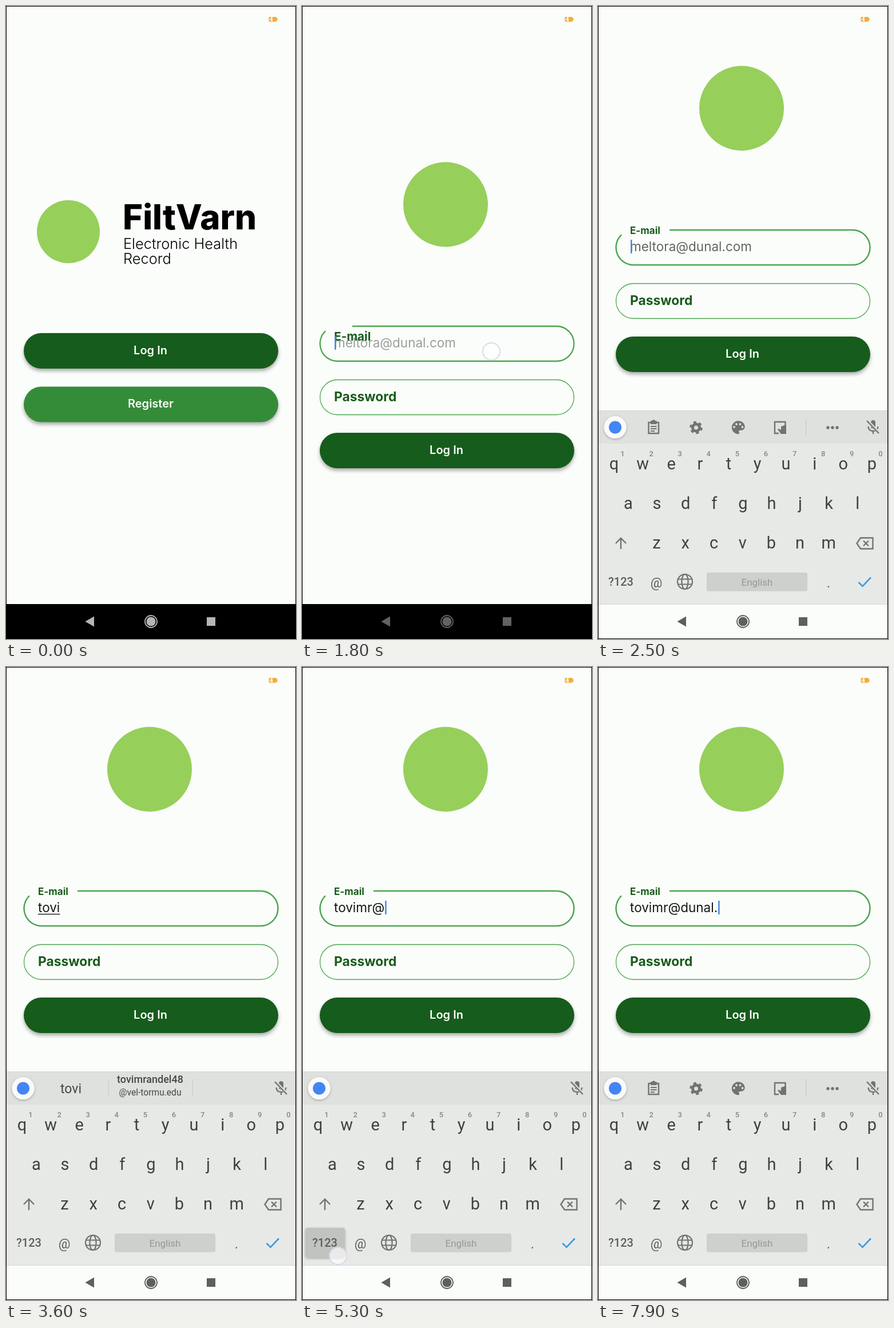
Recreate the animation shown at these times as an HTML page. Size 507 by 1105 pixels, loop 8000 ms.

```html
<!DOCTYPE html>
<html lang="en">
<head>
<meta charset="utf-8">
<title>Sign in</title>
<style>
  html, body { margin: 0; width: 100%; height: 100%; overflow: hidden; background: #fbfdfb; }
  svg { display: block; width: 507px; height: 1105px; }
  text { font-family: Inter, sans-serif; }
  .key text, text.key { font-family: Roboto, sans-serif; }
  .mid { text-anchor: middle; }
  .btn { font-size: 20px; font-weight: 600; fill: #fff; text-anchor: middle; }
  .label { font-weight: 700; fill: #195c1b; }
  .entry { font-size: 22.5px; }
  .line { fill: none; stroke: #707370; stroke-width: 2.4; }
</style>
</head>
<body>
<svg viewBox="0 0 507 1105" xmlns="http://www.w3.org/2000/svg">
  <defs>
    <filter id="drop" x="-10%" y="-20%" width="120%" height="160%">
      <feDropShadow dx="0" dy="4" stdDeviation="3" flood-color="#000" flood-opacity=".33"/>
    </filter>
    <filter id="soft" x="-30%" y="-30%" width="160%" height="160%">
      <feDropShadow dx="0" dy="1.5" stdDeviation="2" flood-color="#000" flood-opacity=".28"/>
    </filter>
  </defs>
  <rect width="507" height="1105" fill="#fbfdfb"/>

  <g id="page">
    <circle id="mark" fill="#97cf5b"/>
    <g id="welcome">
      <text x="204" y="390" font-size="60" font-weight="800">FiltVarn</text>
      <g font-size="25.4" font-weight="300">
        <text x="205" y="423.500">Electronic Health</text>
        <text x="205" y="449.500">Record</text>
      </g>
      <rect x="31" y="664.500" width="445" height="62" rx="31" fill="#358c38" filter="url(#drop)"/>
      <text class="btn" x="253" y="701">Register</text>
    </g>
    <g id="form">
      <path id="box" fill="none" stroke="#4ca64f"/>
      <text id="hint" class="entry" x="56" y="596" fill="#636563">meltora@dunal.com</text>
      <text id="label" class="label" x="56">E-mail</text>
      <text id="typed" class="entry" x="56" y="596" fill="#151815"></text>
      <path id="under" stroke="#222" stroke-width="1.3"/>
      <rect id="caret" y="576" width="2.500" height="24" fill="#4a85e0"/>
      <rect x="31.500" y="652.500" width="444" height="61" rx="30.500" fill="none" stroke="#4ca64f" stroke-width="1.300"/>
      <text class="label" x="56" y="690" font-size="22.8">Password</text>
    </g>
    <g id="login">
      <rect x="31" y="571" width="445" height="62" rx="31" fill="#195c1b" filter="url(#drop)"/>
      <text class="btn" x="252.500" y="608">Log In</text>
    </g>
  </g>

  <g>
    <path d="M461 19H471Q474.500 19.500 474.500 23.200T471 27.400H461Q459.500 27.400 459.500 26V20.400Q459.500 19 461 19Z" fill="#f4ad35"/>
    <text class="key" x="461" y="27" font-size="10" font-weight="700" fill="#fff">4</text>
  </g>

  <g id="board" class="key">
    <rect y="706" width="507" height="400" fill="#e7e9e7"/>
    <rect y="706" width="507" height="58" fill="#dfe1df"/>
    <path d="M0 706.500H507" stroke="#d3d5d3"/>
    <circle cx="30" cy="735.500" r="19.500" fill="#fafafa" filter="url(#soft)"/>
    <circle cx="30" cy="735.500" r="11" fill="#4285f4"/>

    <g id="tools" fill="#707370">
      <path class="line" d="M88.500 727H106V746H88.500Z"/>
      <path d="M92 724H94.500A3 3 0 0 1 100 724H102.500V730H92ZM92 733H102.500V735H92ZM92 737H102.500V739H92ZM92 741H99V743H92Z"/>
      <circle class="line" cx="171.500" cy="736" r="6" style="stroke-width:5"/>
      <circle class="line" cx="171.500" cy="736" r="9.500" style="stroke-width:3.500" stroke-dasharray="4.970"/>
      <path transform="translate(230 720.500) scale(1.270)" d="M12 3a9 9 0 0 0 0 18c.83 0 1.500-.67 1.500-1.500 0-.39-.15-.74-.39-1.010-.23-.26-.38-.61-.38-.99 0-.83.67-1.500 1.500-1.500H16c2.760 0 5-2.240 5-5 0-4.420-4.030-8-9-8z"/>
      <g fill="#dfe1df">
        <circle cx="238" cy="735" r="1.900"/><circle cx="242" cy="730" r="1.900"/>
        <circle cx="248.500" cy="730" r="1.900"/><circle cx="252.500" cy="735" r="1.900"/>
      </g>
      <path class="line" d="M316 746H309V726H327.500V733"/>
      <path d="M329 731V747H320L314 739L316 738L320 740V734Z"/>
      <path d="M363.500 720V750" stroke="#c4c6c4"/>
      <circle cx="402" cy="736" r="2.700"/><circle cx="410" cy="736" r="2.700"/><circle cx="418" cy="736" r="2.700"/>
    </g>
    <g id="suggest" class="mid" fill="#454845">
      <path d="M179.500 720V750M326.500 720V750" stroke="#c9cbc9"/>
      <text id="word" x="113.500" y="744" font-size="23"></text>
      <text x="252" y="726" font-size="18" font-weight="500">tovimrandel48</text>
      <text x="252" y="748" font-size="15.6">@vel-tormu.edu</text>
    </g>
    <g>
      <rect x="477" y="723" width="8" height="15" rx="4" fill="#707370"/>
      <path class="line" d="M472.500 734Q473 742 481 742T489.500 734M481 742V747"/>
      <path d="M471 724L492 746" stroke="#dfe1df" stroke-width="5"/>
      <path class="line" d="M470 724L491 746"/>
    </g>

    <rect id="press" x="6" y="979" width="69" height="52" rx="4" fill="#c1c3c1" filter="url(#soft)"/>
    <g id="keys" class="mid" font-size="29" fill="#3f423f"></g>
    <g id="hints" class="mid" font-size="13" font-weight="500" fill="#858885"></g>
    <path id="shift" class="line" d="M40 948V930M31 938L40 929L49 938"/>
    <path class="line" d="M452.500 938L459 928.500H480.500V947.500H459ZM464 933.500L473 942.500M473 933.500L464 942.500"/>
    <g class="mid" fill="#5b5e5b">
      <text id="mode" x="40" y="1012" font-size="20" font-weight="500"></text>
      <text id="at" x="102" y="1015" font-size="23">@</text>
      <text x="403" y="1015" font-size="24">.</text>
    </g>
    <g class="line" style="stroke-width:2.200">
      <circle cx="152" cy="1005" r="13"/><ellipse cx="152" cy="1005" rx="5.600" ry="13"/>
      <path d="M140 1000.500H164M140 1009.500H164"/>
    </g>
    <rect x="190" y="989" width="176" height="32.500" rx="3" fill="#ced0ce"/>
    <text class="mid" x="278" y="1011.500" font-size="17" fill="#959895">English</text>
    <path d="M455.500 1006L462.500 1013L477 997.500" fill="none" stroke="#3c9bdd" stroke-width="2.600"/>
    <g id="popup">
      <rect x="-24.500" y="-119" width="49" height="148" rx="4" fill="#fafbfa" filter="url(#soft)"/>
      <text id="big" class="mid" y="-73" font-size="36" fill="#3f423f"></text>
    </g>
  </g>

  <g>
    <rect id="bar" y="1044" width="507" height="61"/>
    <path id="rim" d="M0 1044.500H507" stroke="#d6d8d6"/>
    <g id="nav">
      <path d="M138.500 1074.500L154 1065.500V1083.500Z"/>
      <circle cx="253.500" cy="1074.500" r="8"/>
      <circle id="ring" cx="253.500" cy="1074.500" r="10.500" fill="none" stroke-width="1.800"/>
      <rect x="351" y="1067" width="15" height="15"/>
    </g>
  </g>
  <circle id="touch" r="15" fill="#fff" fill-opacity=".65" stroke="#d9d9e8" stroke-width="2"/>
  <rect x=".5" y=".5" width="506" height="1104" fill="none" stroke="#000"/>
</svg>

<script>
const LOOP = 8000, STEP = 100, HOLD = 200;
const $ = id => document.getElementById(id);
const set = (id, attrs) => { for (const k in attrs) $(id).setAttribute(k, attrs[k]); };
const show = (id, on) => set(id, { visibility: on ? "visible" : "hidden" });
const put = (id, s) => { if ($(id).textContent !== s) $(id).textContent = s; };
const ramp = (t, a, b) => Math.min(1, Math.max(0, (t - a) / (b - a)));
const ease = p => 1 - (1 - p) ** 3;
const mix = (a, b, p) => a + (b - a) * p;
const within = (t, a, b) => t >= a && t < b;

// Each row: first key centre, centre line, letters, symbols
const ROWS = [
  [28, 799, "qwertyuiop", "1234567890"],
  [53, 868, "asdfghjkl", "@#$_&-+()"],
  [102.5, 937, "zxcvbnm", "*\"':;!?"]
];
const PITCH = 50.1;
const spots = { ".": [403, 1006] };
const caps = [];

function addText(parent, x, y, s) {
  const el = document.createElementNS("http://www.w3.org/2000/svg", "text");
  el.setAttribute("x", x);
  el.setAttribute("y", y);
  el.textContent = s;
  $(parent).appendChild(el);
  return el;
}
for (const [x0, y, letters, symbols] of ROWS) {
  [...letters].forEach((ch, i) => {
    const x = x0 + i * PITCH;
    caps.push([addText("keys", x, y + 10, ch), ch, symbols[i]]);
    spots[ch] = spots[symbols[i]] = [x, y];
  });
}
for (let i = 0; i < 10; i++) addText("hints", 43 + i * PITCH, 786, (i + 1) % 10);

// Key presses; the character lands after HOLD
const presses = [
  [2800, "t"], [3000, "o"], [3200, "v"], [3400, "i"], [3900, "m"], [4300, "r"],
  [4900, "@"], [5400, "d"], [5600, "u"], [5800, "n"], [6000, "a"], [6200, "l"], [7500, "."]
];
const taps = [
  [200, 400, 325, 602], [1600, 1900, 331, 603],
  [4700, 4900, 58, 1020], [5200, 5400, 63, 1028]
];
const caretOff = [[2000, 2400], [3600, 3900], [6800, 7200]];

function drawPage(t) {
  const route = ease(ramp(t, 400, 800));
  const lift = ease(ramp(t, 1900, 2400));
  const focus = ramp(t, 1700, 1940);
  set("page", { transform: `translate(0 ${-168 * lift})` });
  set("mark", { cx: mix(109, 251, route), cy: mix(394, 346.5, route), r: mix(55, 74, route) });
  set("login", { transform: `translate(0 ${174 * route})` });
  set("welcome", { opacity: 1 - route });
  set("form", { opacity: route });

  const gap = 41 + 84 * Math.min(1, focus * 1.34);
  const left = focus ? "41 567.4" : "62 559Z";
  const start = focus ? gap : 62;
  set("box", {
    d: `M${start} 559H445A30.5 30.5 0 0 1 445 620H62A30.5 30.5 0 0 1 ${left}`,
    "stroke-width": mix(1.3, 2.5, Math.min(1, focus * 2))
  });
  set("label", { y: mix(597, 566, focus), "font-size": mix(23.3, 17, focus) });
  set("board", { transform: `translate(0 ${400 * (1 - lift)})` });
  return focus;
}

function drawEntry(t, text, focus) {
  put("typed", text);
  const width = text ? $("typed").getComputedTextLength() : 0;
  set("hint", { opacity: text ? 0 : Math.min(1, focus * 1.5) });
  set("under", { d: `M56 599.5H${56 + width}` });
  show("under", text && !text.includes("@"));
  set("caret", { x: 57 + width });
  show("caret", t >= 1700 && !caretOff.some(([a, b]) => within(t, a, b)));
}

function drawBoard(t, text) {
  const symbols = within(t, 4900, 5300);
  for (const [el, letter, symbol] of caps) {
    const s = symbols ? symbol : letter;
    if (el.textContent !== s) el.textContent = s;
  }
  show("hints", !symbols);
  show("shift", !symbols);
  put("mode", symbols ? "ABC" : "?123");
  put("at", symbols ? "," : "@");
  show("press", within(t, 4700, 4900) || within(t, 5200, 5400));

  const composing = text && !text.includes("@");
  show("suggest", composing);
  show("tools", !text || text.length > 7);
  put("word", text);

  const held = presses.find(([at]) => within(t, at, at + HOLD));
  show("popup", held);
  if (held) {
    const [x, y] = spots[held[1]];
    set("popup", { transform: `translate(${x} ${y})` });
    put("big", held[1]);
  }
  return held;
}

function drawTouch(t, held) {
  const tap = taps.find(([a, b]) => within(t, a, b));
  show("touch", tap || held);
  if (tap) set("touch", { cx: tap[2], cy: tap[3] });
  else if (held) {
    const [x, y] = spots[held[1]];
    set("touch", { cx: x - 2, cy: y + (held[1] === "." ? 16 : 32) });
  }
}

function drawNav(t) {
  const light = t >= 2000;
  const ink = t < 1700 ? "#b5b5b5" : light ? "#5d605d" : "#626262";
  set("bar", { fill: light ? "#fbfdfb" : "#000" });
  show("rim", light);
  set("nav", { fill: ink });
  set("ring", { stroke: ink });
}

function render(now) {
  const t = Math.floor((now % LOOP) / STEP) * STEP;
  const text = presses.filter(([at]) => t >= at + HOLD).map(p => p[1]).join("");
  const focus = drawPage(t);
  drawEntry(t, text, focus);
  drawTouch(t, drawBoard(t, text));
  drawNav(t);
}

const began = performance.now();
function tick() {
  render(performance.now() - began);
  requestAnimationFrame(tick);
}
tick();
</script>
</body>
</html>
```
